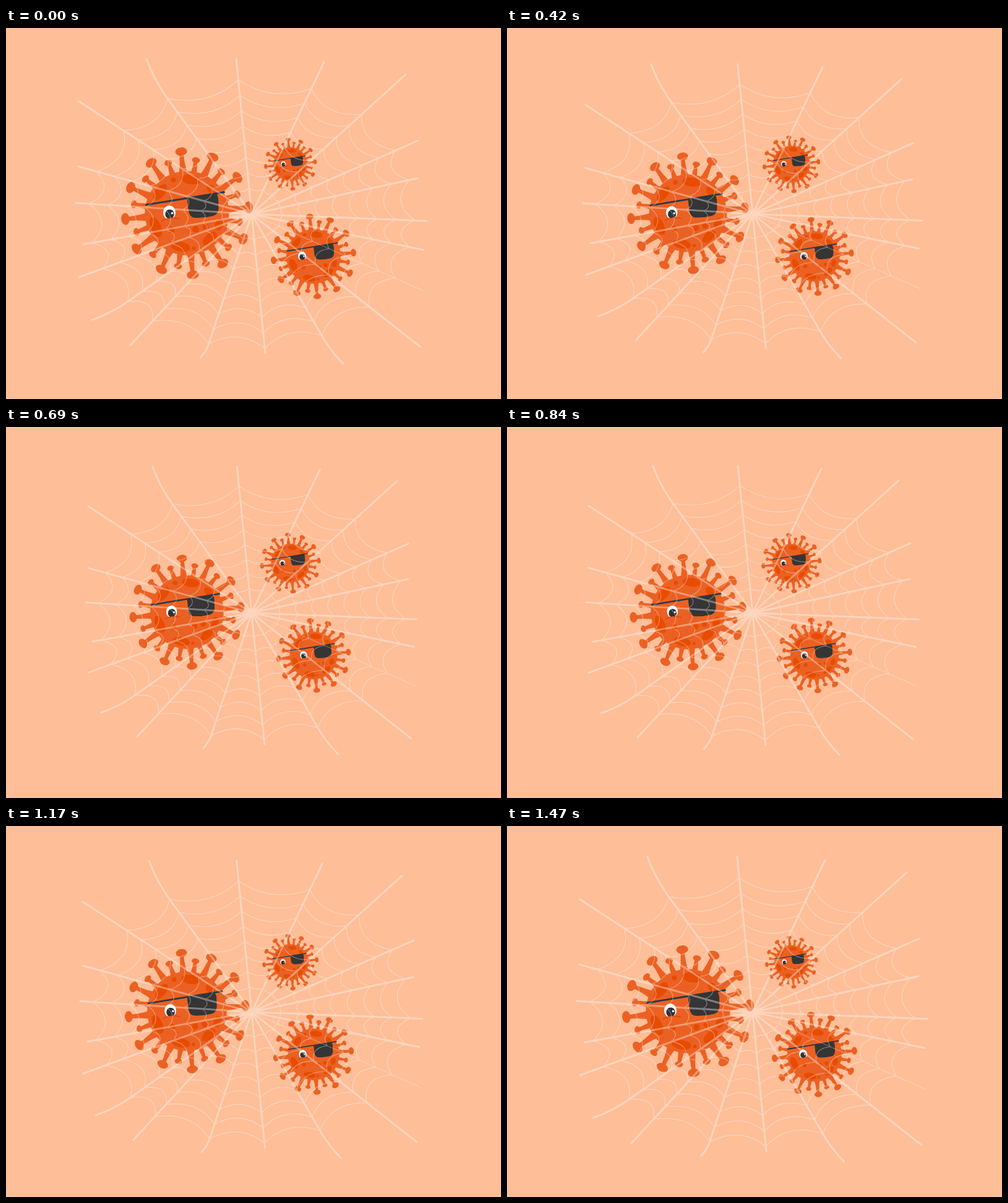
An HTML page that plays this animation: 800 by 600 pixels, repeating every 1500 ms.

```html
<!DOCTYPE html>
<html lang="en">
<head>
<meta charset="utf-8">
<title>Viruses in a web</title>
<style>
html, body { margin: 0; width: 100%; height: 100%; overflow: hidden; background: #fdbe98; }
svg { display: block; width: 100vw; height: 100vh; }
</style>
</head>
<body>
<svg viewBox="0 0 800 600">
  <defs>
    <clipPath id="eyeClip"><ellipse cx="-28.5" cy="-1" rx="11" ry="12"/></clipPath>
    <g id="virus">
      <g id="spikes" fill="#eb6123"></g>
      <circle r="68" fill="#eb6123"/>
      <g id="spots" fill="#e74c00"></g>
      <path d="M-66 -13.5L60 -34" stroke="#263a47" stroke-width="2.8" stroke-linecap="round"/>
      <path d="M0 -25L47 -32Q50 -29 50.5 -24L51 -7Q50 2 42 4.5Q28 8 13 7.5Q4 7 2.5 -4Z" fill="#353535"/>
      <ellipse cx="-28.5" cy="-1" rx="10" ry="11.2" fill="#fff"/>
      <ellipse cx="-28" cy="1.6" rx="7.2" ry="7.8" fill="#303136"/>
      <circle cx="-24" cy="0" r="1.8" fill="#fff"/>
      <path d="M-41 13.5Q-27 5 -12 9.5L-16 16H-38Z" fill="#eb6123"/>
      <path d="M-41 13Q-27 4.5 -12 9.5" fill="none" stroke="#c9430c" stroke-width="1.2"/>
      <rect id="lid" x="-41" y="-14" width="25" height="0" fill="#eb6123" clip-path="url(#eyeClip)"/>
      <path id="crease" d="M-38 -8Q-28.5 -14 -19 -9" fill="none" stroke="#c9430c" stroke-width="1.1"/>
    </g>
  </defs>
  <rect width="800" height="600" fill="#fdbe98"/>
  <g id="crowd"></g>
  <g id="web" fill="none" stroke="#fff" stroke-linecap="round" opacity=".36"></g>
</svg>
<script>
const $ = id => document.getElementById(id);
const add = (parent, tag, attrs) => {
  const el = document.createElementNS('http://www.w3.org/2000/svg', tag);
  for (const k in attrs) el.setAttribute(k, attrs[k]);
  return parent.appendChild(el);
};
const RAD = Math.PI / 180;

// Spikes: long and short ones alternate every 15 degrees
for (let i = 0; i < 24; i++) {
  const k = i % 2 ? .68 : 1;
  const r = i % 2 ? 87 : 100, w = 2 + k, base = 7.5 * k;
  const g = add($('spikes'), 'g', { transform: `rotate(${i * 15 - 5.4})` });
  add(g, 'path', { d: `M${-base} -64Q${-w - 1} -72 ${-w} ${-r}H${w}Q${w + 1} -72 ${base} -64Z` });
  add(g, 'ellipse', { cy: -r, rx: 9.6 * k, ry: 6.8 * k });
}

// Long spots follow the rim: angle, half length
for (const [a, size] of [[-83, 16], [-142, 15], [156, 17], [101, 16], [48, 14], [19, 10], [-43, 10]])
  add($('spots'), 'ellipse', { cy: -55, rx: size, ry: 4 + size / 4, transform: `rotate(${a + 90})` });
for (const [cx, cy, r] of [[14, 26, 5.3], [30, 22, 5], [-25, 27, 5], [11, 57, 3], [-22, -54, 4]])
  add($('spots'), 'circle', { cx, cy, r });

// Viruses: centre, size, relative growth at half loop
const crowd = [
  { x: 292.5, y: 299.5, size: 1, grow: -.135 },
  { x: 497, y: 369.5, size: .648, grow: -.135 },
  { x: 459.7, y: 220.3, size: .4, grow: .163 }
];
for (const v of crowd) v.el = add($('crowd'), 'use', { href: '#virus' });

// Web rays: tip, and the turn in degrees where the ray is bent
const hub = { x: 397, y: 301 };
const tips = [
  [117, 118], [227, 50, -1.9], [372, 50], [514, 55], [646, 75],
  [666, 182], [665, 243], [680, 312], [675, 359], [677, 426],
  [670, 516], [545, 543, 1.5], [419, 526], [314, 533, -1.4], [201, 513],
  [139, 472, -1.7], [118, 403], [125, 350], [113, 283], [117, 224]
];
const thinRay = 9;
const RX = 264, RY = 218, RINGS = 8;

// The threads hang on an oval; a ray is straight up to it
const rays = tips.map(([x, y, turn = 0]) => {
  const a = Math.atan2(y - hub.y, x - hub.x) + turn * RAD;
  const cos = Math.cos(a), sin = Math.sin(a);
  const reach = 1 / Math.hypot(cos / RX, sin / RY);
  const length = Math.hypot(x - hub.x, y - hub.y);
  const at = d => ({ x: hub.x + cos * d, y: hub.y + sin * d });
  return { x, y, at, reach, bend: (reach + length) / 2 };
});
const xy = p => `${p.x} ${p.y}`;

rays.forEach((ray, i) => {
  const next = rays[(i + 1) % rays.length];
  add($('web'), 'path', {
    d: `M${xy(hub)}L${xy(ray.at(ray.reach))}Q${xy(ray.at(ray.bend))} ${xy(ray)}`,
    'stroke-width': i === thinRay ? 1 : 3
  });
  for (let j = 0; j < RINGS; j++) {
    const f = 1 - .115 * j;
    const a = ray.at(ray.reach * f), b = next.at(next.reach * f);
    const sag = (p, q, h) => (p + q) / 2 * .86 + h * .14;
    const c = { x: sag(a.x, b.x, hub.x), y: sag(a.y, b.y, hub.y) };
    add($('web'), 'path', { d: `M${xy(a)}Q${xy(c)} ${xy(b)}`, 'stroke-width': 1.15 });
  }
});

const LOOP = 1500, STEP = 30, HALF = 735;

function draw(ms) {
  const t = Math.floor((ms % LOOP) / STEP) * STEP;
  const k = 1 - Math.abs(t - HALF) / HALF;
  $('web').setAttribute('transform', `translate(396.5 296) scale(${1 - .06 * k}) translate(-396.5 -296)`);
  for (const { el, x, y, size, grow } of crowd)
    el.setAttribute('transform', `translate(${x} ${y}) scale(${size * (1 + grow * k)})`);

  const shut = Math.max(0, 1 - Math.abs(t - 180) / 75);
  $('lid').setAttribute('height', shut * 17);
  $('crease').setAttribute('opacity', Math.min(1, shut * 1.5));
}

const start = performance.now();
function tick() {
  draw(performance.now() - start);
  requestAnimationFrame(tick);
}
tick();
</script>
</body>
</html>
```
